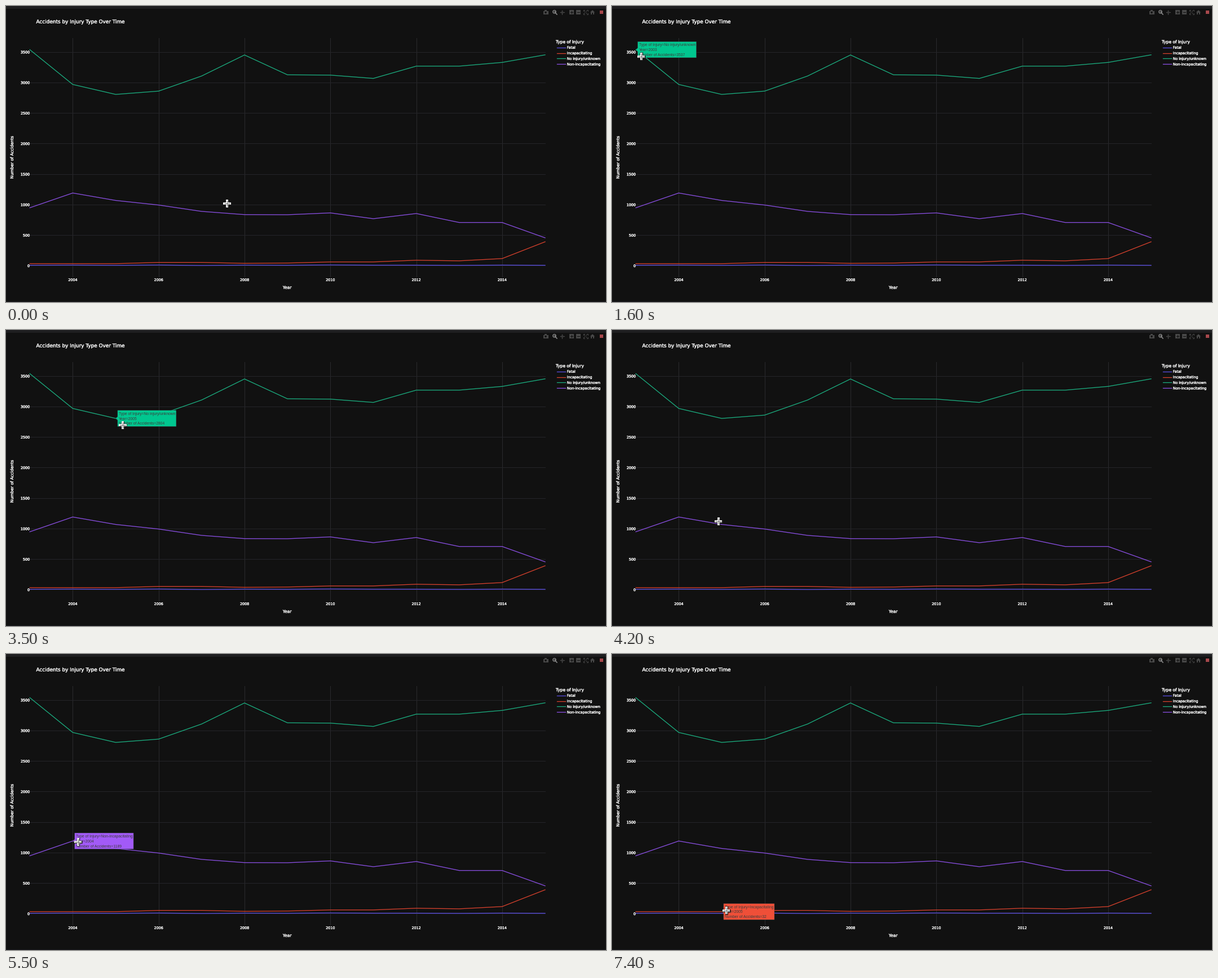
A matplotlib script that plays this animation: 1064x526 px, repeating every 7.5 s.

```python
import numpy as np
import matplotlib.pyplot as plt
from matplotlib.animation import FuncAnimation
from matplotlib.patches import Circle, Polygon, Rectangle
from matplotlib.patheffects import withStroke

W, H, DPI = 1064, 526, 100
PT = 72 / DPI
STEP, FRAMES = 100, 75
HOVER_RADIUS = 20

fig = plt.figure(figsize=(W / DPI, H / DPI), dpi=DPI, facecolor="#111111")
ax = fig.add_axes([0, 0, 1, 1])
ax.set_xlim(0, W)
ax.set_ylim(H, 0)
ax.axis("off")


def line(xs, ys, color, width=1.0, z=2, **kw):
    return ax.plot(xs, ys, color=color, lw=width * PT, zorder=z, **kw)[0]


def box(x, y, w, h, color, z=2):
    ax.add_patch(Rectangle((x, y), w, h, fc=color, ec="none", zorder=z))


def label(x, y, s, size, ha="left"):
    """White text whose capitals are centred on y."""
    ax.text(x, y + 0.365 * size, s, fontsize=size * PT, ha=ha, va="baseline",
            family="DejaVu Sans", color="#f0f0f0", zorder=4,
            path_effects=[withStroke(linewidth=0.25, foreground="#f0f0f0")])


def px(year):
    return 42.2 + 76.15 * (year - 2003)


def py(count):
    return 461.3 - 0.10849 * count


# name, line colour, tooltip colour, yearly counts from 2003
SERIES = [
    ("Fatal", "#5a4ee2", "#636efa",
     [6, 8, 5, 10, 2, 8, 6, 11, 7, 7, 4, 8, 5]),
    ("Incapacitating", "#d8412d", "#ef4f38",
     [32, 32, 32, 52, 52, 37, 42, 60, 60, 88, 78, 115, 390]),
    ("No injury/unknown", "#1bae80", "#00c78f",
     [3537, 2967, 2804, 2858, 3105, 3450, 3125, 3120, 3066, 3267, 3267,
      3328, 3452]),
    ("Non-incapacitating", "#8a4fe3", "#a25af7",
     [947, 1189, 1067, 992, 888, 835, 833, 863, 768, 853, 706, 706, 455]),
]
YEARS = np.arange(2003, 2016)


def draw_chart():
    box(0, 0, W, 4.5, "#1e1e20")
    box(0, 524.5, W, 1.5, "#19181d")
    for year in range(2004, 2016, 2):
        line([px(year)] * 2, [56.5, 481], "#2a2a2d", z=1)
        label(px(year), 486.5, str(year), 6.36, "center")
    for count in range(0, 4000, 500):
        line([42, 956], [py(count)] * 2, "#242429", z=1)
        label(42, py(count) + 0.4, str(count), 6.36, "right")
    label(53.5, 27.5, "Accidents by Injury Type Over Time", 8.9)
    label(498.5, 500, "Year", 7.3, "center")
    ax.text(11, 269, "Number of Accidents", fontsize=7.25 * PT, rotation=90,
            ha="center", va="center", family="DejaVu Sans", color="#f0f0f0",
            path_effects=[withStroke(linewidth=0.25, foreground="#f0f0f0")])
    label(975, 63.5, "Type of Injury", 7.4)
    for i, (name, color, _, counts) in enumerate(SERIES):
        line(px(YEARS), py(np.array(counts)), color, 1.3, z=3 + i / 10)
        y = 73.6 + 9.9 * i
        line([977, 992], [y, y], color, 1.3)
        label(994.7, y, name, 6.3)


def draw_toolbar():
    dim, lit, back = "#484848", "#8c8c8c", "#111111"
    # camera
    box(952.5, 8.5, 9, 6, dim)
    box(955, 7.3, 4, 1.5, dim)
    ax.add_patch(Circle((957, 11.5), 1.8, fc=back, ec="none", zorder=3))
    # magnifier
    ax.add_patch(Circle((972.5, 10.3), 2.7, fc="none", ec=lit, lw=1.3 * PT))
    line([974.6, 977], [12.5, 15], lit, 1.6)
    line([971.2, 973.8], [10.3, 10.3], lit, 0.8)
    line([972.5, 972.5], [9, 11.6], lit, 0.8)
    # four-way arrows
    line([982.5, 989.5], [11, 11], dim, 1)
    line([986, 986], [7.5, 14.5], dim, 1)
    for x, y, mark in [(982.7, 11, "<"), (989.3, 11, ">"),
                       (986, 7.7, "^"), (986, 14.3, "v")]:
        line([x], [y], dim, marker=mark, ms=2.6 * PT, mew=0)
    # zoom in, zoom out
    for x in (1003, 1015):
        box(x - 4, 7, 8, 8, dim)
        line([x - 2.3, x + 2.3], [11, 11], back, 1.1, z=3)
    line([1003, 1003], [8.7, 13.3], back, 1.1, z=3)
    # autoscale
    for sx in (-1, 1):
        for sy in (-1, 1):
            line([1027.7 + sx, 1027.7 + 3.2 * sx], [11 + sy, 11 + 3.2 * sy],
                 dim, 0.9)
            line([1027.7 + 1.8 * sx, 1027.7 + 3.8 * sx, 1027.7 + 3.8 * sx],
                 [11 + 3.8 * sy, 11 + 3.8 * sy, 11 + 1.8 * sy], dim, 0.9)
    # home
    ax.add_patch(Polygon([(1035.8, 11.3), (1040, 7.2), (1044.2, 11.3)],
                         fc=dim, ec="none"))
    box(1037.2, 11, 2, 3.8, dim)
    box(1040.8, 11, 2, 3.8, dim)
    box(1037.2, 10.8, 5.6, 1.4, dim)
    # plain badge
    box(1053, 8, 6, 6, "#a8484c")


def smooth(u):
    return u * u * (3 - 2 * u)


def ease_in(u):
    return u * u


# time, x, y, easing used to arrive there
TRACK = [
    (0, 392, 351, smooth), (800, 49, 87, smooth), (900, 44, 84, smooth),
    (1500, 44, 84, smooth), (2000, 119.5, 138, smooth),
    (2500, 119.5, 138, smooth), (3000, 199, 160, smooth),
    (3500, 207, 169, smooth), (4200, 188.5, 340, ease_in),
    (4900, 188.5, 340, smooth), (5400, 127.5, 334, smooth),
    (5600, 127.5, 334, smooth), (5900, 125, 336, smooth),
    (6100, 125, 336, smooth), (7000, 202.5, 455.5, smooth),
    (7500, 202.5, 455.5, smooth),
]


def cursor_at(t):
    for (t0, x0, y0, _), (t1, x1, y1, ease) in zip(TRACK, TRACK[1:]):
        if t <= t1:
            k = ease((t - t0) / (t1 - t0))
            return x0 + (x1 - x0) * k, y0 + (y1 - y0) * k


def nearest(x, y):
    """Closest data point within hover range as (series, year index)."""
    best, found = HOVER_RADIUS, None
    for s, (_, _, _, counts) in enumerate(SERIES):
        dist = np.hypot(px(YEARS) - x, py(np.array(counts)) - y)
        i = int(dist.argmin())
        if dist[i] < best:
            best, found = dist[i], (s, i)
    return found


draw_chart()
draw_toolbar()

tip = ax.add_patch(Polygon([(0, 0)] * 3, ec="#3c4444", lw=0.4 * PT, zorder=8))
rows = [ax.text(0, 0, "", fontsize=6.73 * PT, family="Liberation Sans",
                color="#3d3d3d", zorder=9) for _ in range(3)]
ARM = 6
cross = [line([], [], c, w, z=z, solid_capstyle="butt")
         for c, w, z in [("#1a1a1a", 5.2, 10), ("#f4f4f4", 3.8, 11),
                         ("#6e6e6e", 1.0, 12)]]


def show_tip(hit):
    for artist in [tip, *rows]:
        artist.set_visible(hit is not None)
    if hit is None:
        return
    s, i = hit
    name, _, color, counts = SERIES[s]
    x, y = px(YEARS[i]), py(counts[i])
    words = (f"Type of Injury={name}", f"Year={YEARS[i]}",
             f"Number of Accidents={counts[i]}")
    for k, (row, s) in enumerate(zip(rows, words)):
        row.set_text(s)
        row.set_position((x + 5.3, y + 8.75 * (k - 1) + 2.6))
    left = x + 3.4
    right = left + max(r.get_window_extent().width for r in rows) + 3.6
    top, bottom = y - 14.3, y + 14.3
    tip.set_xy([(x, y), (left, y - 3.2), (left, top), (right, top),
                (right, bottom), (left, bottom), (left, y + 3.2)])
    tip.set_facecolor(color)


def update(i):
    x, y = cursor_at(i * STEP)
    for part, extra in zip(cross, (0.7, 0, -1.2)):
        r = ARM + 0.6 + extra
        part.set_data([x - r, x + r, np.nan, x, x],
                      [y, y, np.nan, y - r, y + r])
    # the tooltip trails the pointer by one step
    show_tip(nearest(*cursor_at(max(i - 1, 0) * STEP)))
    return [tip, *rows, *cross]


anim = FuncAnimation(fig, update, frames=FRAMES, interval=STEP,
                     repeat=True, repeat_delay=0, blit=False)
plt.show()
```
